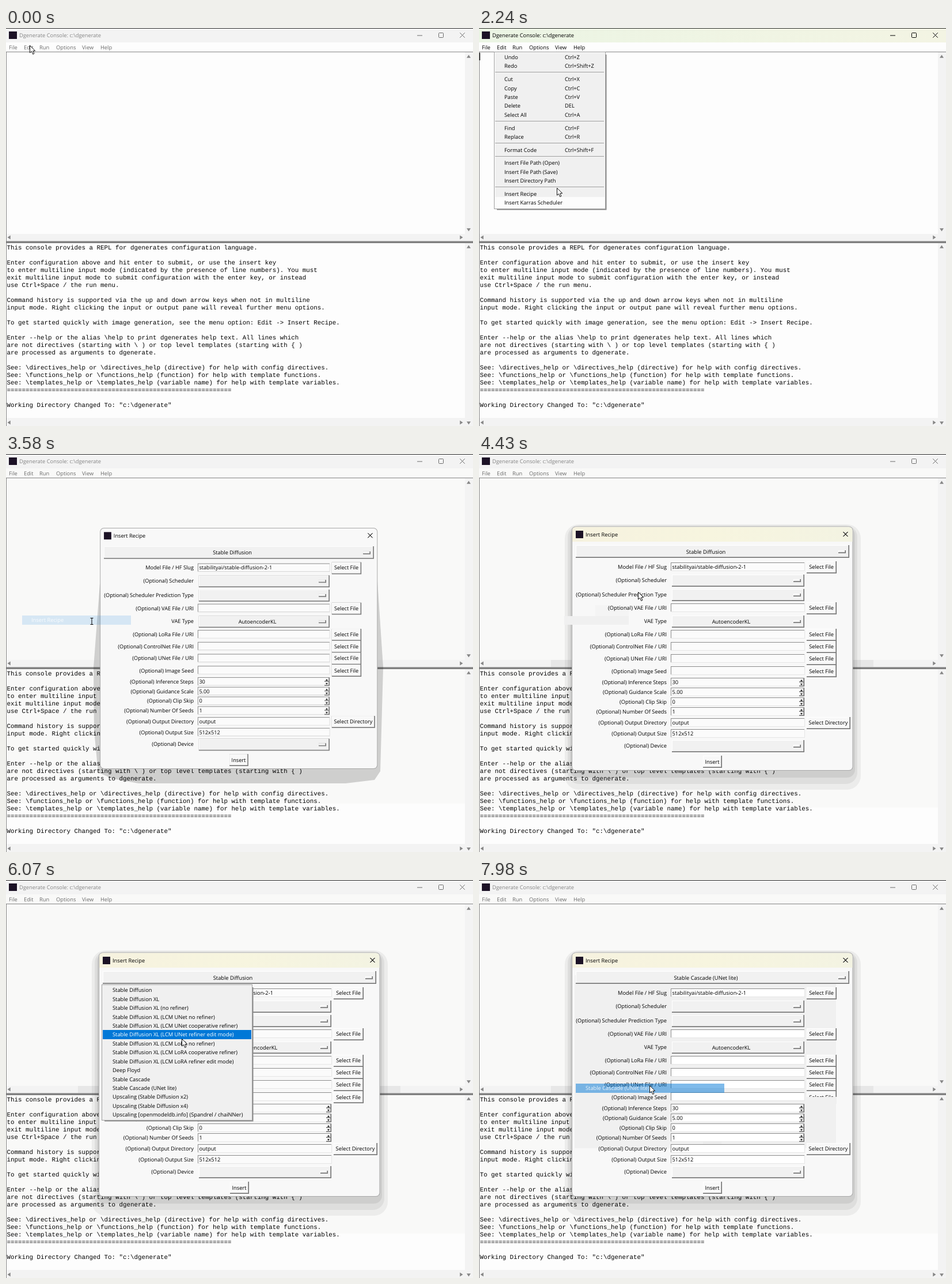
Recreate the animation shown at these times as an HTML page with a canvas. Size 811 px wide and 690 px high, loop 8000 ms.

```html
<!DOCTYPE html>
<html lang="en">
<head>
<meta charset="utf-8">
<title>Console recipe menu</title>
<style>
  html, body { margin: 0; width: 100%; height: 100%; overflow: hidden; background: #fdfdfd; }
  canvas { display: block; }
</style>
</head>
<body>
<canvas id="stage" width="811" height="690"></canvas>
<script>
const g = document.getElementById('stage').getContext('2d');
const UI = '9.3px "Open Sans", "Noto Sans", sans-serif';
const MONO = '10.83px "Liberation Mono", monospace';
const BLUE = '#0078d7';
const LOOP = 8000, MENU = 430, DIALOG = 3460, SETTLED = 3730, LIST = 5520, CHOSEN = 7980;

const consoleText = `This console provides a REPL for dgenerates configuration language.

Enter configuration above and hit enter to submit, or use the insert key
to enter multiline input mode (indicated by the presence of line numbers). You must
exit multiline input mode to submit configuration with the enter key, or instead
use Ctrl+Space / the run menu.

Command history is supported via the up and down arrow keys when not in multiline
input mode. Right clicking the input or output pane will reveal further menu options.

To get started quickly with image generation, see the menu option: Edit -> Insert Recipe.

Enter --help or the alias \\help to print dgenerates help text. All lines which
are not directives (starting with \\ ) or top level templates (starting with { )
are processed as arguments to dgenerate.

See: \\directives_help or \\directives_help (directive) for help with config directives.
See: \\functions_help or \\functions_help (function) for help with template functions.
See: \\templates_help or \\templates_help (variable name) for help with template variables.
${'='.repeat(60)}

Working Directory Changed To: "c:\\dgenerate"`.split('\n');

// '-' marks a separator
const editMenu = ['Undo|Ctrl+Z', 'Redo|Ctrl+Shift+Z', '-', 'Cut|Ctrl+X', 'Copy|Ctrl+C', 'Paste|Ctrl+V',
  'Delete|DEL', 'Select All|Ctrl+A', '-', 'Find|Ctrl+F', 'Replace|Ctrl+R', '-', 'Format Code|Ctrl+Shift+F', '-',
  'Insert File Path (Open)', 'Insert File Path (Save)', 'Insert Directory Path', '-',
  'Insert Recipe', 'Insert Karras Scheduler'];

const XL = 'Stable Diffusion XL';
const recipes = ['Stable Diffusion', XL, XL + ' (no refiner)',
  ...['UNet', 'LoRA'].flatMap(kind => ['no refiner', 'cooperative refiner', 'refiner edit mode']
    .map(mode => `${XL} (LCM ${kind} ${mode})`)),
  'Deep Floyd', 'Stable Cascade', 'Stable Cascade (UNet lite)', 'Upscaling (Stable Diffusion x2)',
  'Upscaling (Stable Diffusion x4)', 'Upscaling [openmodeldb.info] (Spandrel / chaiNNer)'];

// label, centre y, control, value, button
const fields = [
  ['Model File / HF Slug', 196, 'entry', 'stabilityai/stable-diffusion-2-1', 'Select File'],
  ['(Optional) Scheduler', 219, 'option', ''],
  ['(Optional) Scheduler Prediction Type', 244, 'option', ''],
  ['(Optional) VAE File / URI', 267, 'entry', '', 'Select File'],
  ['VAE Type', 290, 'option', 'AutoencoderKL'],
  ['(Optional) LoRa File / URI', 313, 'entry', '', 'Select File'],
  ['(Optional) ControlNet File / URI', 334, 'entry', '', 'Select File'],
  ['(Optional) UNet File / URI', 355, 'entry', '', 'Select File'],
  ['(Optional) Image Seed', 376.5, 'entry', '', 'Select File'],
  ['(Optional) Inference Steps', 396, 'spin', '30'],
  ['(Optional) Guidance Scale', 413, 'spin', '5.00'],
  ['(Optional) Clip Skip', 430, 'spin', '0'],
  ['(Optional) Number Of Seeds', 447, 'spin', '1'],
  ['(Optional) Output Directory', 466, 'entry', 'output', 'Select Directory'],
  ['(Optional) Output Size', 485, 'entry', '512x512'],
  ['(Optional) Device', 506, 'option', '']];

// pointer steps: time, x, y, highlighted row
const pointer = [[0, 41, 30], [1430, 83, 97, 'Cut'], [1580, 92, 132, 'Paste'], [1700, 101, 165, 'Select All'],
  [1850, 112, 202, 'Replace'], [1970, 120, 232, 'Insert File Path (Open)'], [2120, 128, 258, 'Insert Directory Path'],
  [2240, 135, 277], [2360, 141, 285, 'Insert Recipe'], [2480, 145, 288, 'Insert Recipe'],
  [2600, 148, 289, 'Insert Recipe'], [4190, 202, 264], [4310, 248, 250], [4430, 276, 239], [4550, 294, 213],
  [4700, 313, 193], [4850, 325, 179], [4970, 332, 168], [5120, 336, 164],
  [6070, 305, 275, recipes[5]], [6190, 303, 302, recipes[7]], [6310, 301, 325, recipes[9]],
  [6460, 299, 340, recipes[10]], [6580, 298, 347, recipes[10]], [6700, 297, 350, recipes[10]],
  [6850, 297, 351, recipes[10]], [7000, 297, 353, recipes[11]], [7240, 297, 355, recipes[11]], [7390, 296, 356, recipes[11]]];

function box(x1, y1, x2, y2, color) {
  g.fillStyle = color;
  g.fillRect(x1, y1, x2 - x1, y2 - y1);
}
function text(s, x, y, color = '#000', align = 'left', font = UI) {
  g.font = font;
  g.textAlign = align;
  g.fillStyle = color;
  g.fillText(s, x, y + 3);
}
function path(points, fill, stroke, width = 1) {
  g.beginPath();
  points.forEach(([x, y]) => g.lineTo(x, y));
  g.closePath();
  if (fill) { g.fillStyle = fill; g.fill(); }
  if (stroke) { g.strokeStyle = stroke; g.lineWidth = width; g.stroke(); }
}
function rounded(x1, y1, x2, y2, r, color) {
  g.beginPath();
  g.roundRect(x1, y1, x2 - x1, y2 - y1, r);
  g.fillStyle = color;
  g.fill();
}
function arrow(x, y, dx, dy, size = 3.5, color = '#868686') {
  const back = size / 2;
  path([[x + dx * size, y + dy * size], [x - dx * back + dy * size, y - dy * back + dx * size],
    [x - dx * back - dy * size, y - dy * back - dx * size]], color);
}
function cross(x, y, color) {
  path([[x - 4, y - 4], [x + 4, y + 4]], null, color);
  path([[x + 4, y - 4], [x - 4, y + 4]], null, color);
}
function raised(x1, y1, x2, y2, face) {
  box(x1, y1, x2, y2, '#6c6c6c');
  box(x1, y1, x2 - 1, y2 - 1, '#a8a8a8');
  box(x1, y1, x2 - 2, y2 - 2, '#fff');
  box(x1 + 1, y1 + 1, x2 - 2, y2 - 2, face);
}
function sunken(x1, y1, x2, y2, face) {
  box(x1, y1, x2, y2, '#e6e6e6');
  box(x1, y1, x2 - 1, y2 - 1, '#8c8c8c');
  box(x1 + 1, y1 + 1, x2 - 1, y2 - 1, face);
}
function optionButton(x1, y1, x2, y2, label, mid) {
  raised(x1, y1, x2, y2, '#f1f1f1');
  const y = (y1 + y2) / 2 | 0;
  raised(x2 - 19, y - 2, x2 - 6, y + 3, '#f1f1f1');
  text(label, mid, y + .5, '#000', 'center');
}
function popup(x1, y1, x2, y2, face) {
  box(x1 + 5, y1 + 5, x2 + 1.5, y2 + 1.5, '#8a8a8a');
  box(x1, y1, x2, y2, '#a0a0a0');
  box(x1 + 1, y1 + 1, x2 - 1, y2 - 1, face);
}
function highlight(left, right, y) {
  const top = Math.floor(y - 7.5);
  box(left, top, right, top + 16, BLUE);
}

function drawWindow(t) {
  const active = t >= MENU && t < DIALOG;
  const ink = active ? '#000' : '#6a6a6a';
  box(0, 0, 811, 690, '#fdfdfd');
  if (t >= DIALOG) box(0, 0, 811, t < SETTLED ? 606 : 613, '#f9f9f8');

  const bar = g.createLinearGradient(0, 0, 811, 0);
  bar.addColorStop(0, active ? '#ebf5e4' : '#f3f3f3');
  bar.addColorStop(1, active ? '#f3f4e3' : '#f3f3f3');
  box(0, 0, 811, 25, bar);
  box(0, 0, 811, 1, '#2b2b2b');
  box(5, 6, 19, 19, '#1c1226');
  text('Dgenerate Console: c:\\dgenerate', 23, 13, active ? '#000' : '#858585');
  box(714, 12.5, 723, 13.5, ink);
  g.strokeStyle = ink;
  g.lineWidth = 1;
  g.beginPath();
  g.roundRect(751.5, 8.5, 8, 8, 1);
  g.stroke();
  cross(792.5, 12.5, ink);
  [['File', 5], ['Edit', 31], ['Run', 58], ['Options', 87], ['View', 132], ['Help', 164]]
    .forEach(([name, x]) => text(name, x, 33.5, ink));

  box(797, 42, 811, 690, '#f3f3f3');
  box(0, 357, 811, 370, '#f3f3f3');
  box(0, 676, 811, 690, '#f3f3f3');
  box(0, 41, 811, 42, '#868686');
  box(0, 42, 1, 690, '#868686');
  box(0, 369.5, 811, 373, '#808080');
  [[50, 349, 363], [380, 684, 684]].forEach(([up, down, row]) => {
    arrow(803.5, up, 0, -1);
    arrow(803.5, down, 0, 1);
    arrow(6, row, -1, 0);
    arrow(790, row, 1, 0);
  });
  consoleText.forEach((line, i) => text(line, 1.5, 381 + 13 * i, '#000', 'left', MONO));

  const caretOff = [[1010, 1280], [1850, 2120], [2750, 3030]].some(([a, b]) => t >= a && t < b);
  if (active && !caretOff) box(1, 43, 2, 56, '#000');
}

function drawEditMenu(t, [, , tipY, hot]) {
  popup(26, 41, 220, 314, '#fcfcfc');
  box(28, 43, 218, t < 1430 ? 43 : Math.min(305, Math.max(113, tipY + 16)), '#f0f0f0');
  let y = 51;
  for (const item of editMenu) {
    if (item === '-') {
      box(28, Math.floor(y - 5), 217, Math.floor(y - 4), '#a0a0a0');
      y += 7.2;
      continue;
    }
    const [name, keys] = item.split('|');
    const on = name === hot;
    if (on) highlight(28, 217, y);
    text(name, 44, y, on ? '#fff' : '#000');
    if (keys) text(keys, 149, y, on ? '#fff' : '#000');
    y += 15.45;
  }
}

function drawShadow(t) {
  if (t < SETTLED) {
    const shade = 'rgba(0,0,0,.17)';
    path([[163, 225], [152, 370], [153, 480], [160, 552], [185, 563], [230, 571], [590, 571],
      [640, 565], [650, 550], [655, 370], [645, 220]], shade);
    return;
  }
  rounded(149, 122, 663, 582, 24, 'rgba(0,0,0,.05)');
  rounded(154, 124, 657, 572, 20, 'rgba(0,0,0,.06)');
  rounded(158, 127, 653, 561, 14, 'rgba(0,0,0,.07)');
  box(125, 357, 685, 369, 'rgba(0,0,0,.05)');
}

function drawDialog(t) {
  const settled = t >= SETTLED, chosen = t >= CHOSEN;
  const face = chosen ? '#fff' : '#fbfbfb';
  rounded(161, 125.5, 649.5, 549, 7, '#a9a9a9');
  rounded(162, 126.5, 648.5, 548, 6, '#f8f8f8');
  if (settled) {
    const bar = g.createLinearGradient(162, 0, 649, 0);
    bar.addColorStop(0, '#f6f2df');
    bar.addColorStop(.5, '#f7f5df');
    bar.addColorStop(1, '#f3f3e2');
    rounded(162, 126.5, 648.5, 152, [6, 6, 0, 0], bar);
  }
  if (chosen) {
    box(166, 165, 620, 465, '#f0f0f0');
    box(389, 443, 421, 465, '#ececec');
  } else if (t >= 4190 && t < LIST) {
    box(148, 281, 260, 296, '#f0f0f0');
    box(202, 262, 260, 281, '#f4f4f4');
  }
  box(168, 133, 181, 146, '#1c1226');
  text('Insert Recipe', 185, 139.5);
  cross(636.5, 139, '#111');
  optionButton(168, 158, 643, 180, recipes[chosen ? 11 : 0], 394);

  for (const [label, y, kind, value, button] of fields) {
    text(label, 326, y, '#000', 'right');
    const row = Math.floor(y);
    if (kind === 'option') {
      optionButton(335, row - 10, 565, row + 11, value, 438);
    } else {
      sunken(333, row - 8, 566, row + 7, face);
      text(value, 335.5, y);
    }
    if (kind === 'spin') {
      raised(556, row - 7, 565, row, '#f3f3f3');
      raised(556, row, 565, row + 7, '#f3f3f3');
      arrow(560, row - 3, 0, -1, 2, '#222');
      arrow(560, row + 3, 0, 1, 2, '#222');
    }
    if (button) {
      const right = button === 'Select File' ? 621 : 645;
      raised(569, row - 10, right, row + 11, '#f8f8f8');
      text(button, (568 + right) / 2, y, '#000', 'center');
    }
  }
  if (chosen) box(569, 376, 621, 388, '#f0f0f0');
  raised(389, 523, 422, 544, '#f8f8f8');
  text('Insert', 405, 533.5, '#000', 'center');
}

function drawRecipeList(hot) {
  popup(166, 181, 428, 417, '#f0f0f0');
  recipes.forEach((name, i) => {
    const y = 191.3 + 15.43 * i, on = name === hot;
    if (on) highlight(168, 426, y);
    text(name, 185, y, on ? '#fff' : '#000');
  });
}

// menu row left behind while its popup fades
function fadingRow(label, x, y, left, right, alpha) {
  g.globalAlpha = alpha;
  highlight(left, right, y);
  g.globalAlpha = 1;
  text(label, x, y, 'rgba(255,255,255,.85)');
}

function drawPointer(t, [, x, y]) {
  if (t >= DIALOG && t < 4190) {
    box(148.5, 284, 149.5, 296, '#000');
    box(146.5, 284, 151.5, 285, '#000');
    box(146.5, 295, 151.5, 296, '#000');
    return;
  }
  path([[0, 0], [0, 12.5], [3, 10], [5.2, 15], [7.4, 14], [5.3, 9.3], [9.3, 9.1]]
    .map(([px, py]) => [x + .5 + px, y + .5 + py]), '#fff', '#111');
}

function draw(t) {
  const now = pointer.findLast(step => step[0] <= t);
  drawWindow(t);
  if (t >= MENU && t < DIALOG) drawEditMenu(t, now);
  if (t >= DIALOG) {
    const opening = t < 3580;
    g.save();
    if (opening) g.globalAlpha = .6;
    drawShadow(t);
    if (t < SETTLED) {
      const scale = opening ? .95 : .987;
      g.translate(326, 314);
      g.scale(scale, scale);
      g.translate(-326, -314);
    }
    drawDialog(t);
    g.restore();
    if (t < SETTLED) fadingRow('Insert Recipe', 44, 288, 28, 217, opening ? .5 : .14);
    if (t >= LIST && t < CHOSEN) drawRecipeList(now[3]);
    if (t >= CHOSEN) fadingRow(recipes[11], 185, 361, 168, 426, .5);
  }
  drawPointer(t, now);
}

g.textRendering = 'geometricPrecision';
const start = performance.now();
function frame() {
  draw((performance.now() - start) % LOOP);
  requestAnimationFrame(frame);
}
frame();
</script>
</body>
</html>
```
